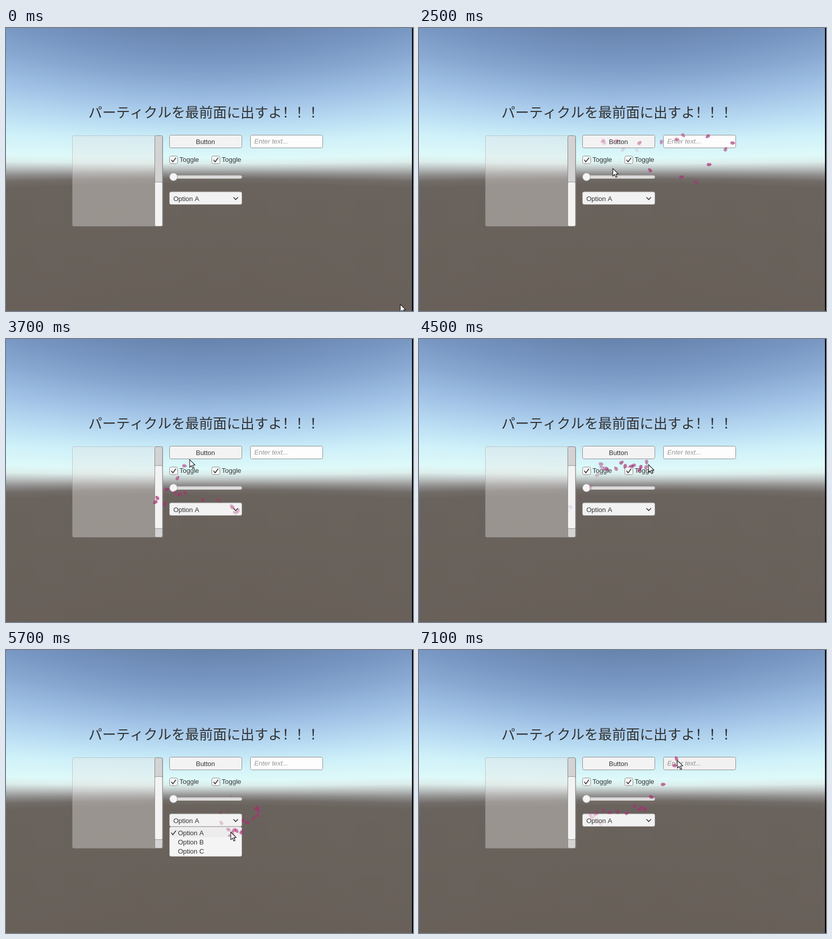
Recreate the animation shown at these times as an HTML page with a canvas. Size 800 by 556 pixels, loop 7200 ms.

```html
<!DOCTYPE html>
<html lang="ja">
<head>
<meta charset="utf-8">
<title>UI particles</title>
<style>
html, body { margin: 0; width: 100%; height: 100%; overflow: hidden; background: #000; }
canvas { display: block; width: 800px; height: 556px; }
</style>
</head>
<body>
<canvas id="stage" width="800" height="556"></canvas>
<script>
const W = 800, H = 556, LOOP = 7200, STEP = 100;
const ctx = document.getElementById('stage').getContext('2d');
const UI_FONT = '13px "Liberation Sans", Arial, sans-serif';
const TITLE_FONT = '300 27.2px "Noto Sans CJK JP", "Noto Sans CJK", sans-serif';
const INK = '#323232';

// Stops of the pointer: time, x, y
const stops = [
  [0, 775, 543], [700, 48, 128], [900, 154, 133], [1150, 251, 187], [1400, 437, 212],
  [1600, 355, 206], [1950, 522, 205], [2100, 620, 212], [2300, 540, 296], [2500, 381, 276],
  [2850, 459, 316], [3200, 342, 288], [3400, 295, 320], [3700, 361, 237], [4550, 452, 247],
  [4750, 424, 305], [4950, 441, 350], [5200, 501, 304], [5600, 450, 362], [6200, 340, 306],
  [6800, 438, 303], [7100, 508, 217]
];

const petals = { first: 850, every: 65, life: 1150, fall: .022 };

const clamp = v => Math.max(0, Math.min(1, v));
const lerp = (a, b, k) => a + (b - a) * k;
const smooth = k => k * k * (3 - 2 * k);
const rand = n => {
  const v = Math.sin(n * 127.1 + 11.7) * 43758.5453;
  return v - Math.floor(v);
};

function pointerAt(t) {
  const i = stops.findIndex(s => s[0] > t);
  if (i < 0) return stops[stops.length - 1].slice(1);
  const [t0, x0, y0] = stops[i - 1], [t1, x1, y1] = stops[i];
  const k = smooth((t - t0) / (t1 - t0));
  return [lerp(x0, x1, k), lerp(y0, y1, k)];
}

// Sky bands stay at a constant elevation, so they bend toward the horizon at the sides.
function makeSky() {
  const sky = document.createElement('canvas');
  sky.width = W;
  sky.height = H;
  const c = sky.getContext('2d');
  const horizon = 278, focal = 481;
  const bands = [
    [0, '#6784ae'], [60, '#7796c1'], [100, '#87a7d1'], [150, '#a2c3e6'], [190, '#b9dcf3'],
    [225, '#cff1f9'], [255, '#def9f9'], [266, '#dceeec'], [276, '#bbc2c1'],
    [286, '#929190'], [296, '#726c68'], [306, '#6a635d'], [556, '#675f58']
  ];
  for (let x = 0; x < W; x += 2) {
    const s = Math.hypot(1, (x - 399) / focal);
    const g = c.createLinearGradient(0, horizon * (1 - s), 0, horizon + (H - horizon) * s);
    bands.forEach(([y, color]) => g.addColorStop(y / H, color));
    c.fillStyle = g;
    c.fillRect(x, 0, 2, H);
  }
  c.fillStyle = '#000';
  c.fillRect(798, 0, 2, H);
  return sky;
}
const sky = makeSky();

function box(x, y, w, h, fill, border = '#8d8d8d', r = 3) {
  ctx.beginPath();
  ctx.roundRect(x + .5, y + .5, w - 1, h - 1, r);
  ctx.fillStyle = fill;
  ctx.fill();
  ctx.strokeStyle = border;
  ctx.lineWidth = 1;
  ctx.stroke();
}

function label(text, x, y, font = UI_FONT, color = INK, align = 'left') {
  ctx.font = font;
  ctx.fillStyle = color;
  ctx.textAlign = align;
  ctx.fillText(text, x, y);
}

function line(points, width = 1.6, color = INK) {
  ctx.beginPath();
  points.forEach(([x, y]) => ctx.lineTo(x, y));
  ctx.strokeStyle = color;
  ctx.lineWidth = width;
  ctx.stroke();
}

const check = (x, y) => line([[x - 4.5, y], [x - 1.5, y + 4], [x + 4.5, y - 4]]);

function drawTitle() {
  label('パーティクルを最前面に出すよ', 162, 175.5, TITLE_FONT);
  for (let i = 0; i < 3; i++) label('！', 549.5 + i * 27.2, 175.5, TITLE_FONT, INK, 'center');
}

function drawScrollView(t) {
  box(130, 211, 179, 179, 'rgba(232,228,226,.38)', 'rgba(140,143,142,.4)');
  box(292, 211, 16, 179, '#d4d3d3', '#858585');
  const k = clamp((t - 3200) / 200);
  const top = lerp(302, 248, k), bottom = lerp(390, 373, k);
  box(292, top, 16, bottom - top, '#f3f3f3', '#8f8f8f');
}

function drawControls(t, [px, py]) {
  const open = t >= 4900 && t < 5800;
  const over = (x, y, w, h) => !open && px >= x && px < x + w && py >= y && py < y + h;

  box(321, 210, 143, 26, over(321, 210, 143, 26) ? '#e5e5e5' : '#f4f3f4');
  label('Button', 392, 227.5, UI_FONT, INK, 'center');

  box(480, 210, 143, 26, over(480, 210, 143, 26) ? '#f1f1f1' : '#fdfdfd');
  label('Enter text...', 488, 227, 'italic ' + UI_FONT, 'rgba(50,50,50,.5)');

  for (const x of [321, 404]) {
    box(x, 251, 17, 16, '#f5f5f5');
    check(x + 8.5, 259);
    label('Toggle', x + 20, 263);
  }

  box(325, 289.5, 139, 6.5, '#dedddd', '#d2d1d0');
  ctx.beginPath();
  ctx.arc(329.2, 292.5, 7.7, 0, Math.PI * 2);
  ctx.fillStyle = '#f5f5f5';
  ctx.fill();
  ctx.strokeStyle = '#a3a3a3';
  ctx.lineWidth = 1;
  ctx.stroke();

  box(321, 321.5, 143, 25.5, over(321, 322, 143, 25) ? '#eeeeee' : '#f2f2f2', '#bdbbb9');
  label('Option A', 329, 339.5);
  line([[447, 332.5], [451.5, 337], [456, 332.5]]);

  if (open) {
    box(321, 347, 143, 59, '#f5f4f5', '#b4b2b1');
    ctx.fillStyle = '#eeeded';
    ctx.fillRect(322, 349, 141, 19);
    check(329.5, 359);
    ['A', 'B', 'C'].forEach((c, i) => label('Option ' + c, 338, 364 + i * 18));
  }
}

function drawPetal(x, y, angle, alpha) {
  ctx.save();
  ctx.translate(x, y);
  ctx.rotate(angle);
  ctx.globalAlpha = alpha;
  ctx.beginPath();
  ctx.moveTo(-5, 0);
  ctx.bezierCurveTo(-2, -4.5, 3.5, -4.2, 5, -1);
  ctx.lineTo(4.2, 0);
  ctx.lineTo(5, 1);
  ctx.bezierCurveTo(3.5, 4.2, -2, 4.5, -5, 0);
  ctx.fillStyle = '#ae3077';
  ctx.fill();
  line([[-4, 0], [3, 0]], .7, 'rgba(110,20,65,.6)');
  ctx.restore();
}

// The pointer sheds petals at a steady rate, so they gather where it slows down.
function drawPetals(t) {
  const { first, every, life, fall } = petals;
  for (let n = 0, born = first; born <= t; born = first + ++n * every) {
    const age = t - born;
    if (age >= life) continue;
    const [x, y] = pointerAt(born);
    const dx = (rand(n) - .5) * 12, dy = (rand(n + 200) - .5) * 16;
    const angle = rand(n + 400) * 6.3 + age * .0025 * (rand(n + 500) - .5);
    const fade = clamp((life - age) / 650);
    drawPetal(x + dx, y + dy + age * fall, angle, (.5 + .2 * rand(n + 600)) * fade);
  }
}

function drawPointer([x, y]) {
  ctx.save();
  ctx.translate(x, y);
  ctx.beginPath();
  [[0, 0], [0, 15], [3.4, 11.8], [6, 17.5], [8.4, 16.4], [5.9, 10.9], [10.5, 10.5]]
    .forEach(p => ctx.lineTo(...p));
  ctx.closePath();
  ctx.fillStyle = '#fff';
  ctx.fill();
  ctx.strokeStyle = '#151515';
  ctx.lineWidth = 1.1;
  ctx.stroke();
  ctx.restore();
}

function draw(now) {
  const t = Math.floor((now % LOOP) / STEP) * STEP;
  const pointer = pointerAt(t);
  ctx.drawImage(sky, 0, 0);
  drawTitle();
  drawScrollView(t);
  drawControls(t, pointer);
  drawPetals(t);
  drawPointer(pointer);
}

const begin = performance.now();
function tick() {
  draw(performance.now() - begin);
  requestAnimationFrame(tick);
}
tick();
</script>
</body>
</html>
```
